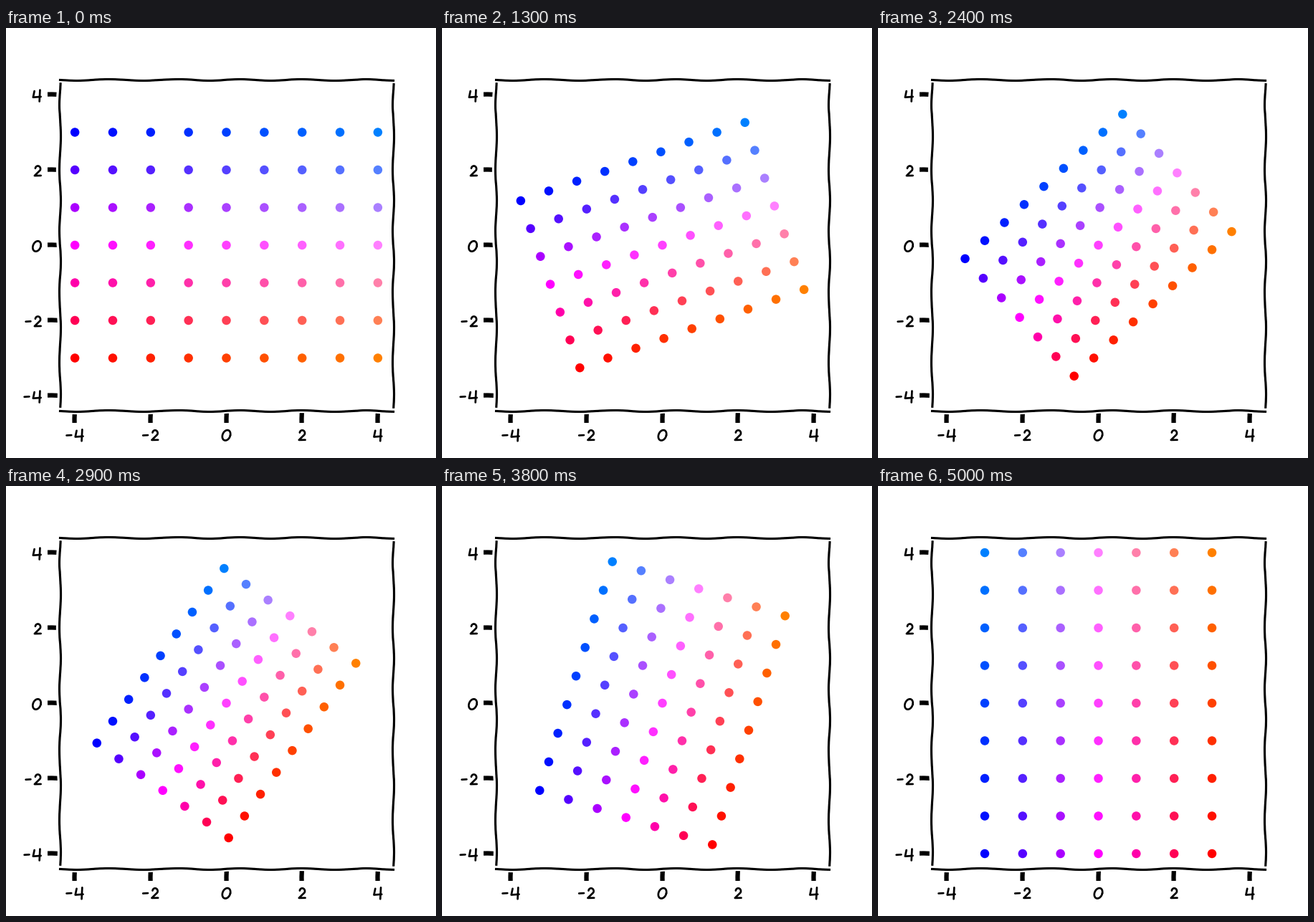
A matplotlib script that plays this animation: 600x600 px, repeating every 5.1 s.

```python
import numpy as np
import matplotlib.pyplot as plt
from matplotlib import patheffects
from matplotlib.animation import FuncAnimation
from matplotlib.lines import Line2D
from matplotlib.transforms import Affine2D

SIZE = 600
FRAMES = 51
INTERVAL = 100
LIMIT = 4.4
TICKS = range(-4, 5, 2)

# Hand-drawn look: wobbly lines with a white halo.
plt.rcParams.update({
    "path.sketch": (1, 100, 2),
    "path.effects": [patheffects.withStroke(linewidth=4, foreground="w")],
    "axes.linewidth": 1.5,
    "xtick.major.size": 8,
    "xtick.major.width": 3,
    "ytick.major.size": 8,
    "ytick.major.width": 3,
})

fig = plt.figure(figsize=(4, 4), dpi=150, facecolor="white")
ax = fig.add_axes([0.125, 0.11, 0.775, 0.77])
ax.set(xlim=(-LIMIT, LIMIT), ylim=(-LIMIT, LIMIT), xticks=TICKS, yticks=TICKS)
ax.tick_params(labelleft=False, labelbottom=False)

# Pixel coordinates with the origin at the top left.
pixels = Affine2D().scale(1 / SIZE, -1 / SIZE).translate(0, 1) + fig.transFigure


def arc(cx, cy, rx, ry, start, end, slant=0):
    a = np.radians(np.linspace(start, end, 40))
    x = cx + rx * np.cos(a) - slant * ry * np.sin(a)
    return list(zip(x, cy + ry * np.sin(a)))


# Pen strokes of each character around its centre, y down.
GLYPHS = {
    "0": [arc(0, 0, 5.5, 7.2, 0, 360, slant=0.2)],
    "2": [arc(0.2, -3, 3.6, 4, 190, 390) + [(-4.4, 6.6), (4.4, 6.4)]],
    "4": [[(-3.6, -6.5), (-5.4, 2.2), (5.4, 1.4)], [(4.2, -8), (3.4, 8)]],
    "-": [[(-3.4, 0.2), (3.4, -0.2)]],
}
WIDTHS = {"0": 14, "2": 11.5, "4": 13.5, "-": 9}
GAP = 3


def draw_glyph(char, cx, cy):
    for stroke in GLYPHS[char]:
        x, y = np.transpose(stroke)
        fig.add_artist(Line2D(x + cx, y + cy, color="black", linewidth=1.3,
                              solid_capstyle="round", solid_joinstyle="round",
                              sketch_params=None, path_effects=[],
                              transform=pixels))


def draw_label(text, x, y, align):
    """Draw text whose left edge is x minus the share align of its width."""
    width = sum(WIDTHS[c] for c in text) + GAP * (len(text) - 1)
    x -= align * width
    for char in text:
        draw_glyph(char, x + WIDTHS[char] / 2, y)
        x += WIDTHS[char] + GAP


for v in TICKS:
    px, py = ax.transData.transform((v, v))
    draw_label(str(v), px, 568.3, align=0.5)
    draw_label(str(v), 50, SIZE - py + 1.5, align=1)


def color(x, y):
    return min(1, 1 - y / 3), 1 / 4 + x / 16, min(1, 1 + y / 3)


grid = np.array([(x, y) for y in range(-3, 4) for x in range(-4, 5)], float)
turned = np.column_stack([-grid[:, 1], grid[:, 0]])  # quarter turn
dots = ax.scatter(grid[:, 0], grid[:, 1], s=36, edgecolor="none",
                  c=[color(x, y) for x, y in grid])
# Dots stay perfectly round.
dots.set_sketch_params(None)
dots.set_path_effects([])


def update(frame):
    t = frame / (FRAMES - 1)
    dots.set_offsets((1 - t) * grid + t * turned)
    return [dots]


anim = FuncAnimation(fig, update, frames=FRAMES, interval=INTERVAL,
                     repeat=True, repeat_delay=0)
plt.show()
```
